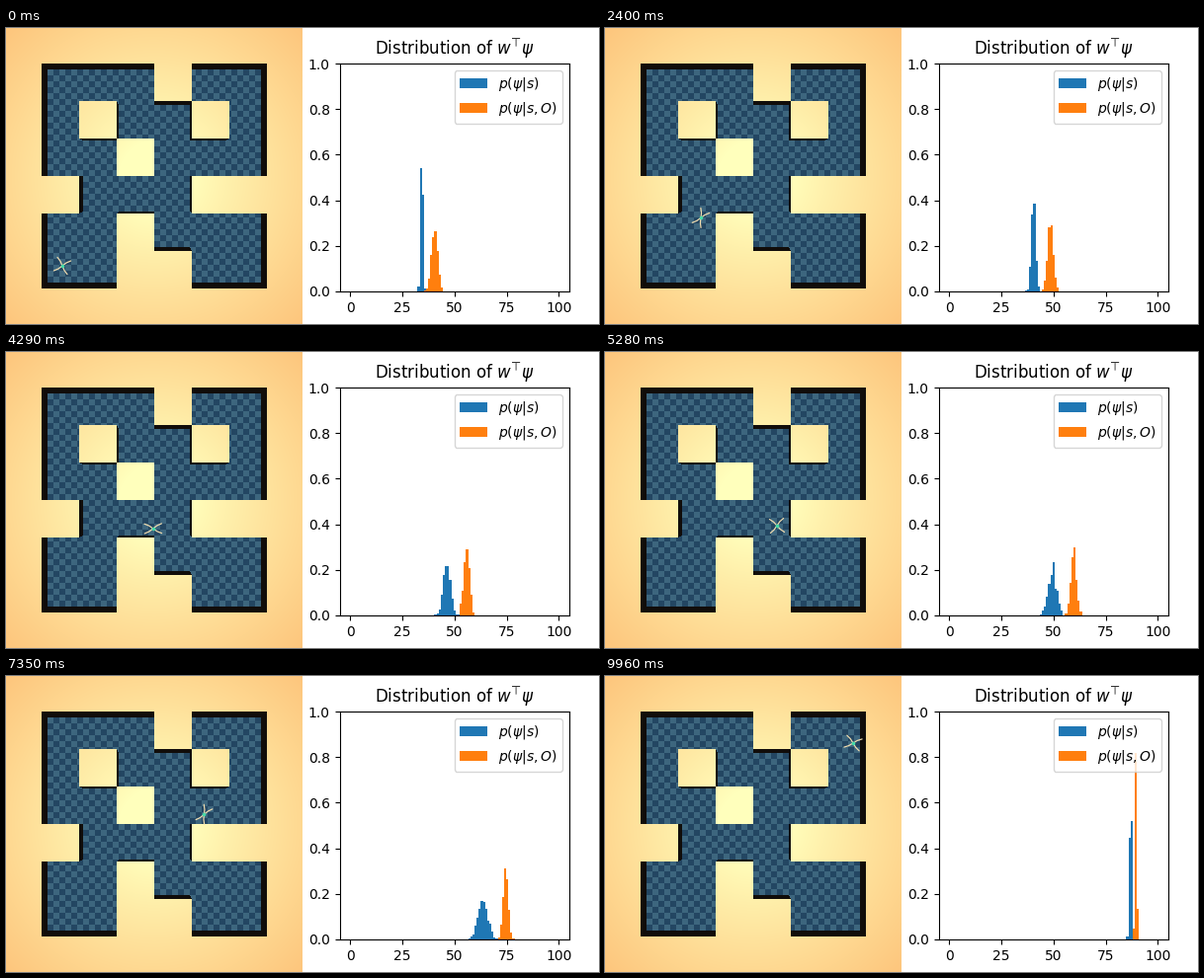
A matplotlib script for the animation above (9990 ms loop, 600 by 300 pixels).

```python
import numpy as np
import matplotlib.pyplot as plt
from matplotlib.animation import FuncAnimation

FRAMES, STEP = 333, 30
DURATION = (FRAMES - 1) * STEP / 1000
SIZE, MID, EDGE, CELL = 300, 150, 36, 38
BASE_SCALE = 108 / 114          # floor is farther from the camera than wall tops
PX = 0.72                       # one pixel in points at 100 dpi

MAZE = ["...#..",
        ".#..#.",
        "..#...",
        "#...##",
        "..#...",
        "..##.."]
GRID = np.pad([[c == "#" for c in row] for row in MAZE], 1,
              constant_values=True)

# waypoints of the walk: seconds, x, y
WALK = np.array([(0, 57, 241), (1.5, 80, 210), (3.3, 117, 179),
                 (5.28, 174, 176), (6.42, 175, 149), (8.28, 230, 129),
                 (DURATION, 251, 68)])

BINS = np.linspace(0, 100, 100)
SAMPLES = 1000


def is_wall(x, y):
    def index(p):
        return np.clip(np.floor((p - EDGE) / CELL).astype(int) + 1, 0, 7)
    return GRID[index(y), index(x)]


def maze_image():
    y, x = np.mgrid[:SIZE, :SIZE] + 0.5
    dark, light = np.array([(35, 70, 98), (61, 102, 126)])
    img = np.where(((x // 6 + y // 6) % 2 == 1)[..., None], dark, light)

    # wall faces: every slice of the walls between floor and top
    for s in np.linspace(BASE_SCALE, 1, 16):
        img[is_wall(MID + (x - MID) / s, MID + (y - MID) / s)] = (17, 13, 10)

    # wall tops, lit by a lamp above the centre
    shade = np.clip((np.hypot(x - MID, y - MID) - 35) / 177, 0, 1) ** 0.9
    glow = np.array([255, 255, 188]) - shade[..., None] * [2, 58, 64]
    top = is_wall(x, y)
    img[top] = glow[top].round()
    return img.astype(np.uint8)


def smoothstep(u):
    u = np.clip(u, 0, 1)
    return u * u * (3 - 2 * u)


def walk(t):
    """Cubic Hermite curve through the waypoints."""
    times, pts = WALK[:, 0], WALK[:, 1:]
    i = min(np.searchsorted(times, t, side="right") - 1, len(times) - 2)
    span = times[i + 1] - times[i]
    u = (t - times[i]) / span
    slope = np.gradient(pts, times, axis=0) * span
    ease = smoothstep(u)
    return ((1 - ease) * pts[i] + ease * pts[i + 1]
            + u * (1 - u)**2 * slope[i] - u**2 * (1 - u) * slope[i + 1])


def ant_legs(t, body):
    """Hip, knee and foot of each leg; neighbours swing in opposition."""
    side = np.array([1, -1, 1, -1])
    yaw = -15 - 20 * np.sin(2 * np.pi * t / 6.6)
    swing = 16 * np.sin(2 * np.pi * 1.8 * t) * side
    angle = np.radians(45 + 90 * np.arange(4) + yaw + swing)

    def point(a, reach):
        return body + reach * np.stack([np.cos(a), -np.sin(a)], axis=-1)

    knees, feet = point(angle + 0.12 * side, 5), point(angle, 10)
    return [np.array([body, k, f]) for k, f in zip(knees, feet)]


def distributions(t):
    """Mean and spread for s, then for s with O."""
    u = t / DURATION
    mean = 34.3 + 2.25 * t**1.15 + 21 * smoothstep((t - 5.7) / 4.26)
    gap = 6.2 + 0.78 * t - 11.4 * u**8
    spread = 0.48 + 1.9 * np.sin(np.pi * u**1.8)
    return (mean, spread), (mean + gap, 1.4 - 1.04 * u**6)


def histogram(rng, mean, spread):
    return np.histogram(rng.normal(mean, spread, SAMPLES), BINS)[0] / SAMPLES


fig = plt.figure(figsize=(6, 3), dpi=100, facecolor="white")

scene = fig.add_axes([0, 0, 0.5, 1])
scene.imshow(maze_image(), extent=(0, SIZE, SIZE, 0), interpolation="nearest")
scene.set(xlim=(0, SIZE), ylim=(SIZE, 0))
scene.axis("off")
legs = [scene.plot([], [], color="#f3deb0", lw=1.2 * PX,
                   solid_capstyle="round")[0] for _ in range(4)]
torso, = scene.plot([], [], "o", color="#45dca8", ms=3.6 * PX, mew=0)

ax = fig.add_axes([0.5625, 0.11, 0.3875, 0.77])
empty = np.zeros(len(BINS) - 1)
bars = [ax.stairs(empty, BINS, fill=True, color=color, label=label)
        for color, label in (("C0", r"$p(\psi|s)$"), ("C1", r"$p(\psi|s,O)$"))]
ax.set(xlim=(-5, 105), ylim=(0, 1), xticks=range(0, 101, 25))
# the plain character avoids the wide spacing of \top
ax.set_title("Distribution of $w^⊤\\psi$")
ax.legend(loc="upper right")


def update(frame):
    t = frame * STEP / 1000
    body = walk(t)
    torso.set_data([body[0]], [body[1]])
    for line, pts in zip(legs, ant_legs(t, body)):
        line.set_data(pts[:, 0], pts[:, 1])

    rng = np.random.default_rng(frame)
    for bar, (mean, spread) in zip(bars, distributions(t)):
        bar.set_data(histogram(rng, mean, spread))
    return [*legs, torso, *bars]


anim = FuncAnimation(fig, update, frames=FRAMES, interval=STEP,
                     repeat=True, repeat_delay=0)
plt.show()
```
